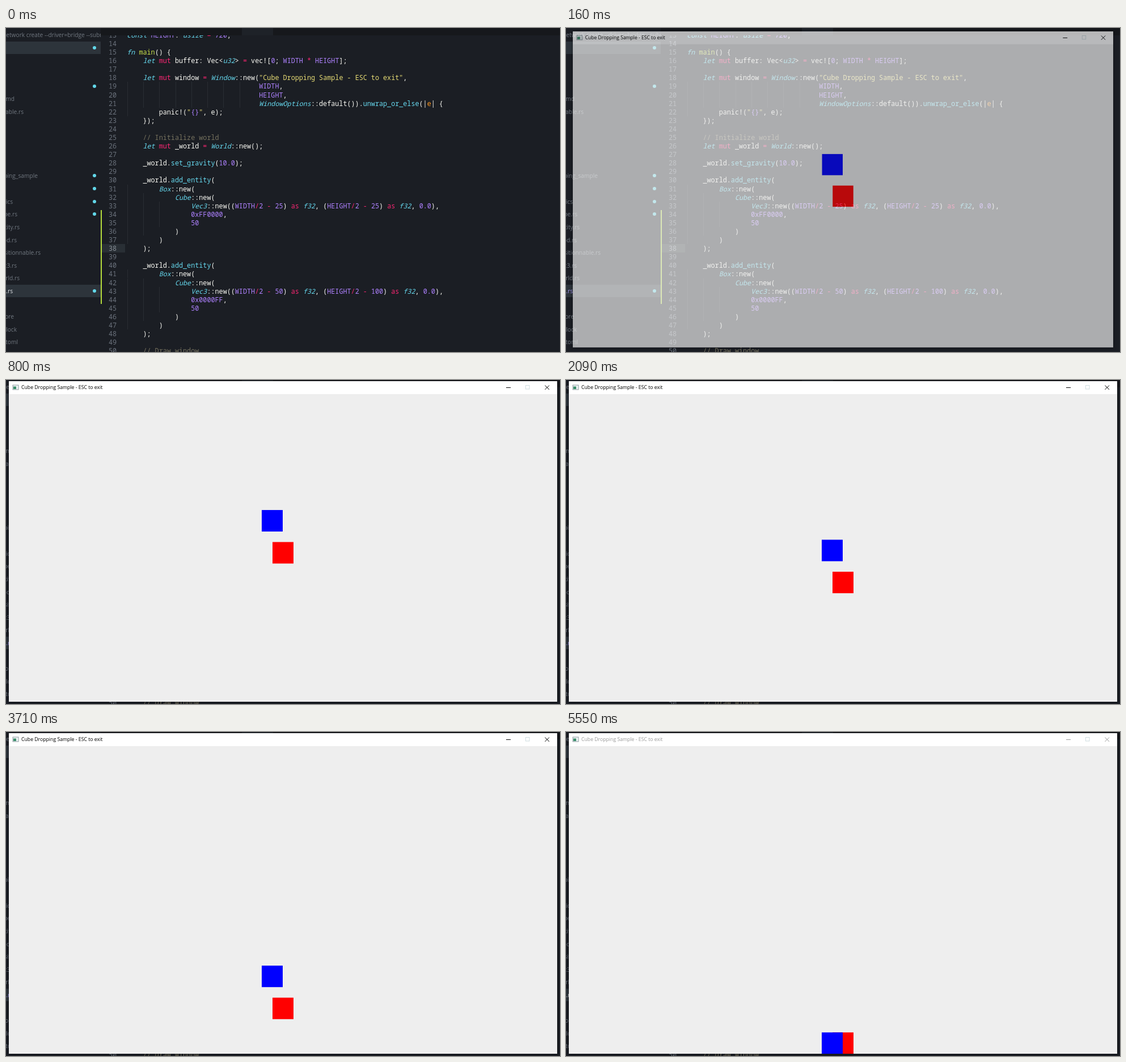
Animation of 977 by 573 pixels, one loop 5650 ms. Source, as an HTML page:

```html
<!DOCTYPE html>
<html lang="en">
<head>
<meta charset="utf-8">
<title>Falling cubes</title>
<style>
html, body { margin: 0; width: 100%; height: 100%; overflow: hidden; background: #1b1e24; }
#stage { position: relative; width: 977px; height: 573px; overflow: hidden; background: #1b1e24; }
#stage div, #stage i.dot, svg { position: absolute; }

#side { left: 0; top: 0; width: 167px; height: 573px; overflow: hidden; color: #717880;
  font: 10.2px/22px "Open Sans", "Noto Sans", sans-serif; white-space: pre; }
#side .row { left: 0; width: 167px; height: 22px; background: #2d343b; }
#side .current { color: #e4e7ea; }
#stage.open .current { color: #a395ee; }
.dot { left: 153px; width: 6px; height: 6px; border-radius: 50%; background: #62d8ea; }

#code { left: 0; top: 4.9px; font: 11.77px/15.09px "Noto Sans Mono", "DejaVu Sans Mono", monospace;
  color: #f8f8f2; white-space: pre; font-variant-ligatures: none; }
#code .num { left: 169px; width: 26px; text-align: right; color: #6b727c; }
#code .num.on { color: #8b929a; }
#code .line { left: 213.2px; }
#code .guide { left: 213.5px; height: 15.09px;
  background: repeating-linear-gradient(90deg, #292d33 0 1px, transparent 1px 28.24px); }
.key, .type { color: #66d9ef; font-style: italic; }
.call { color: #66d9ef; }
.op { color: #f92672; }
.val { color: #ae81ff; }
.str { color: #e6db74; }
.main { color: #c8e04a; }
.arg { color: #fd971f; }
.note { color: #75715e; }

#tabs { left: 167px; top: 0; width: 810px; height: 13px; background: #16181c; }
#tabs div { left: 249px; top: 0; width: 55px; height: 13px; background: #1e2228; }
#mark { left: 169px; top: 382px; width: 41px; height: 15px; background: #292f35; }
#git { left: 167px; top: 322px; width: 2px; height: 166px; background: #b5dc3c; }

#win { left: 5px; top: 2px; width: 967px; height: 567px; background: #eee; overflow: hidden;
  box-shadow: 0 0 7px rgba(0, 0, 0, .45); transform-origin: 50% 50%; color: #000; }
#bar { left: 0; top: 0; width: 967px; height: 23px; background: #fff; }
#name { left: 22px; top: 0; font: 8.7px/23px "Open Sans", "Noto Sans", sans-serif; white-space: pre; }
#win svg { left: 0; top: 0; }
#win.idle { color: #999; }
.cube { top: 0; width: 37.6px; height: 37.7px; }
#red { left: 464.6px; background: #f00; }
#blue { left: 445.8px; background: #00f; }
</style>
</head>
<body>
<div id="stage">
  <div id="side"></div>
  <div id="mark"></div>
  <div id="code"></div>
  <div id="tabs"><div></div></div>
  <div id="git"></div>
  <div id="win">
    <div id="bar"></div>
    <div id="name">Cube Dropping Sample - ESC to exit</div>
    <svg width="967" height="23" fill="none" stroke="currentColor">
      <rect x="7" y="7" width="10" height="8" fill="#eef3f4" stroke="#8d9aa0"/>
      <rect x="8" y="9.5" width="5" height="4.5" fill="#3c8f6c" stroke="none"/>
      <path d="M877 11.5h8M945.5 7.5l7.5 7.5M953 7.5l-7.5 7.5"/>
      <rect x="911.5" y="7.5" width="6.5" height="6.5" stroke="#cfdde0"/>
    </svg>
    <div id="red" class="cube"></div>
    <div id="blue" class="cube"></div>
  </div>
</div>
<script>
const $ = id => document.getElementById(id);
const LOOP = 5650, CLOSE = 5550, PITCH = 15.09, CHAR = 7.062;

function add(parent, cls, css, text = '') {
  const el = document.createElement('div');
  el.className = cls;
  Object.assign(el.style, css);
  el.textContent = text;
  parent.append(el);
  return el;
}

// Sidebar: label, right edge, centre line
const side = $('side');
for (const y of [24, 454]) add(side, 'row', { top: y + 'px' });
add(side, '', { left: '-6px', top: '1px' }, 'network create --driver=bridge --subnet');
const files = [
  ['README.md', 15, 125], ['positionable.rs', 31, 148], ['cube_dropping_sample', 56, 261],
  ['physics', 12, 307], ['cube.rs', 20, 329], ['entity.rs', 24, 352], ['mod.rs', 19, 375],
  ['positionnable.rs', 61, 397], ['vec3.rs', 19, 420], ['world.rs', 24, 442],
  ['main.rs', 12, 465], ['.gitignore', 14, 510], ['Cargo.lock', 19, 533], ['Cargo.toml', 21, 555]
];
for (const [label, right, y] of files)
  add(side, label === 'main.rs' ? 'current' : '', { right: 167 - right + 'px', top: y - 11 + 'px' }, label);
for (const y of [35, 103, 261, 284, 307, 329, 465]) add(side, 'dot', { top: y - 3 + 'px' });

// Code, starting at line 13
const pad = ' '.repeat(33);
const source = `const HEIGHT: usize = 720;

fn main() {
    let mut buffer: Vec<u32> = vec![0; WIDTH * HEIGHT];

    let mut window = Window::new("Cube Dropping Sample - ESC to exit",
${pad}WIDTH,
${pad}HEIGHT,
${pad}WindowOptions::default()).unwrap_or_else(|e| {
        panic!("{}", e);
    });

    // Initialize world
    let mut _world = World::new();

    _world.set_gravity(10.0);

    _world.add_entity(
        Box::new(
            Cube::new(
                Vec3::new((WIDTH/2 - 25) as f32, (HEIGHT/2 - 25) as f32, 0.0),
                0xFF0000,
                50
            )
        )
    );

    _world.add_entity(
        Box::new(
            Cube::new(
                Vec3::new((WIDTH/2 - 50) as f32, (HEIGHT/2 - 100) as f32, 0.0),
                0x0000FF,
                50
            )
        )
    );

    // Draw window`.split('\n');

const rules = [
  ['note', '\\/\\/.*'],
  ['str', '"[^"{]+"|"'],
  ['type', '\\w+(?=::)|\\b(?:u32|f32|usize)\\b'],
  ['key', '\\b(?:fn|let|const)\\b'],
  ['op', '\\b(?:mut|as)\\b|[=*\\/-]'],
  ['call', '(?<=\\.)[a-z_]+(?=\\()'],
  ['main', '\\bmain\\b'],
  ['arg', '(?<=\\|)e(?=\\|)'],
  ['val', '\\{\\}|\\b0x[0-9A-F]+|\\b\\d[\\d.]*\\b|\\b[A-Z]{3,}\\b']
];
const lexer = new RegExp(rules.map(([name, re]) => `(?<${name}>${re})`).join('|'), 'g');

function paint(el, text) {
  let at = 0;
  for (const m of text.matchAll(lexer)) {
    const span = document.createElement('span');
    span.className = rules.find(([name]) => m.groups[name] !== undefined)[0];
    span.textContent = m[0];
    el.append(text.slice(at, m.index), span);
    at = m.index + m[0].length;
  }
  el.append(text.slice(at));
}

source.forEach((text, i) => {
  const n = i + 13, top = i * PITCH + 'px';
  const indent = text ? text.search(/\S/) : n > 15 ? 4 : 0;
  add($('code'), n === 38 ? 'num on' : 'num', { top }, n);
  if (indent) add($('code'), 'guide', { top, width: Math.floor((indent + 3) / 4) * 4 * CHAR - 28 + 'px' });
  paint(add($('code'), 'line', { top }), text);
});

// Simulation ticks: first, last, count
const runs = [
  [50, 600, 11], [700, 1260, 13], [1310, 1860, 13], [1910, 2470, 13],
  [2520, 3080, 13], [3110, 3660, 13], [3710, 4270, 13], [4300, 4730, 10]
];

function tickAt(t) {
  let base = -11, tick = base;
  for (const [from, to, count] of runs) {
    if (t < from) break;
    const p = Math.min(1, (t - from) / (to - from));
    tick = base + Math.min(count - 1, Math.floor(p * (count - 1) + .37));
    base += count;
  }
  return tick;
}

const FLOOR = 529.3;
const drop = (id, y) => { $(id).style.transform = `translateY(${Math.min(FLOOR, y)}px)`; };

function draw(t) {
  const win = $('win'), open = t >= 50, tick = tickAt(t);
  win.style.visibility = open ? 'visible' : 'hidden';
  $('stage').classList.toggle('open', open && t < CLOSE);
  win.classList.toggle('idle', t >= CLOSE);

  const shown = tick < 0 ? Math.min(t, 50 + 55 * (tick + 11)) : t;
  const left = Math.max(0, 1 - (shown - 40) / 310);
  const shrink = .0145 * Math.exp((160 - shown) / 70);
  win.style.opacity = 1 - left ** 2.4;
  win.style.transform = shrink > .0004 ? `scale(${1 - shrink})` : 'none';

  const y = 218.6 + .0295 * (tick + 15.8) ** 2;
  drop('blue', y);
  drop('red', y + 56.6);
}

const start = performance.now();
function frame() {
  draw((performance.now() - start) % LOOP);
  requestAnimationFrame(frame);
}
frame();
</script>
</body>
</html>
```
